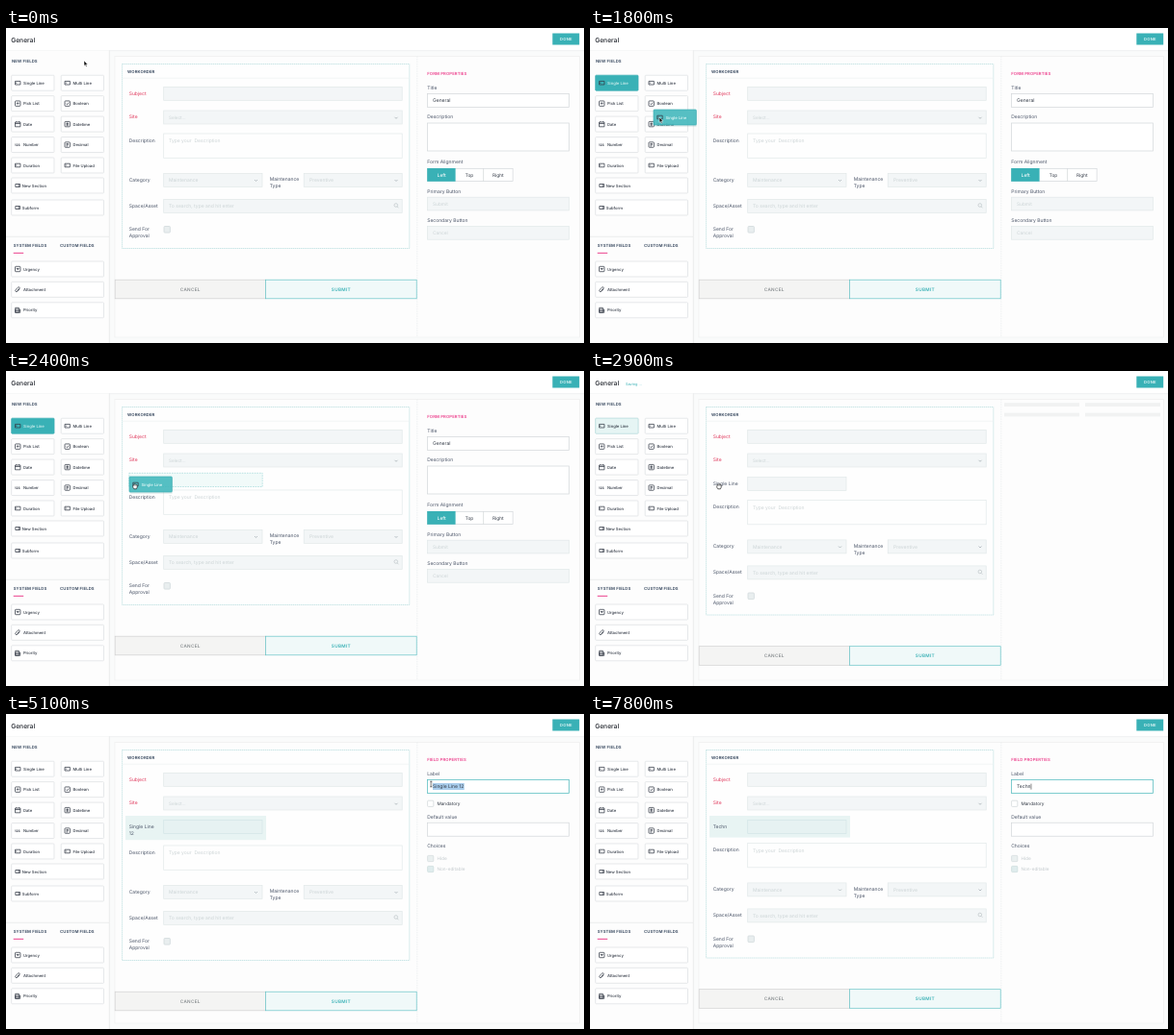
An HTML page for the animation above (8000 ms loop, 600 by 328 pixels).

```html
<!DOCTYPE html>
<html lang="en">
<head>
<meta charset="utf-8">
<title>Form builder</title>
<style>
  html, body { margin: 0; width: 100%; height: 100%; overflow: hidden; background: #fff; }
  svg { display: block; width: 600px; height: 328px; font-family: Inter, "Open Sans", sans-serif; text-rendering: geometricPrecision; }
  text { white-space: pre; }
</style>
</head>
<body>
<script>
const LOOP = 8000;
const TEAL = '#39b1b6', INK = '#333a46', NAVY = '#2f4058', LABEL = '#4b5568';
const RED = '#e0385c', PINK = '#ec3f8c', HINT = '#ccd4d6';
const rules = [];

const pct = ms => (ms / LOOP * 100).toFixed(3) + '%';

// Registers keyframes and returns the style that plays them.
function play(frames) {
  const name = 'k' + rules.length;
  rules.push(`@keyframes ${name}{${frames.join('')}}`);
  return `style="animation:${name} ${LOOP}ms step-end infinite"`;
}

// Holds each value from its time until the next one.
function hold(prop, ...keys) {
  const last = keys[keys.length - 1];
  return play([...keys, [LOOP, last[1]]].map(([ms, v]) => `${pct(ms)}{${prop}:${v}}`));
}

// Shows the markup only during the given [from, to] spans.
function during(spans, markup) {
  const keys = spans[0][0] > 0 ? [[0, 'hidden']] : [];
  for (const [from, to] of spans) {
    keys.push([from, 'visible']);
    if (to < LOOP) keys.push([to, 'hidden']);
  }
  return `<g ${hold('visibility', ...keys)}>${markup}</g>`;
}

// Moves along points, ten positions a second.
function path(points) {
  return play(points.map(([ms, x, y], i) => {
    const next = points[i + 1];
    const n = next ? Math.max(1, Math.round((next[0] - ms) / 100)) : 1;
    return `${pct(ms)}{transform:translate(${x}px,${y}px);animation-timing-function:steps(${n},end)}`;
  }));
}

// Text is placed by the middle of its capitals.
const text = (x, y, s, fill = LABEL, size = 5, extra = '') =>
  `<text x="${x}" y="${(y + size * .36).toFixed(2)}" font-size="${size}" fill="${fill}" ${extra}>${s}</text>`;
const rect = (x, y, w, h, fill, stroke = 'none', extra = '') =>
  `<rect x="${x}" y="${y}" width="${w}" height="${h}" fill="${fill}" stroke="${stroke}" stroke-width=".7" ${extra}/>`;
const line = (d, stroke, w = .7, extra = '') =>
  `<path d="${d}" fill="none" stroke="${stroke}" stroke-width="${w}" ${extra}/>`;
const head = (x, y, s, fill = NAVY) => text(x, y, s, fill, 4.25, 'font-weight="600" letter-spacing=".1"');
const mid = 'text-anchor="middle"';

const SQUARE = 'M-2-2.7h4q.7 0 .7.7v4q0 .7-.7.7h-4q-.7 0-.7-.7v-4q0-.7.7-.7z';
const ICONS = {
  line: 'M-2.7-1.8h5.4v3.6h-5.4zM-1.5-.7v1.4',
  pick: SQUARE + 'M-1.2-.5l1.2 1.2l1.2-1.2z',
  check: SQUARE + 'M-1.3 0l1 1l1.7-2',
  date: 'M-2.7-2.1h5.4v4.8h-5.4zM-2.7-.6h5.4M-1.4-2.9v1M1.4-2.9v1',
  grid: SQUARE + 'M-1.4-.8h2.8M-1.4.9h2.8M0-1.5v3',
  doc: SQUARE + 'M-1.2-1h2.4M-1.2.2h2.4M-1.2 1.4h1.4',
  slim: 'M-2.4-1.5h4.8v3h-4.8zM1-1.5v3',
  clip: 'M2.2-.6l-2.5 2.5q-1.1.9-1.9.1q-.8-.9.1-1.9l2.5-2.4q.8-.6 1.3 0q.5.6-.1 1.3l-2.3 2.2',
  rank: 'M-2.5-2.5h3.6v5h-3.6zM-2.5-.8h5v3.3h-5zM-2.5.9h5'
};
const icon = (name, x, y) => name === 'num'
  ? text(x - 3.2, y, '123', INK, 3.3, 'font-weight="700"')
  : line(ICONS[name], INK, .75, `transform="translate(${x} ${y})"`);

function tile(x, y, w, name, s, fill = '#fff', stroke = '#dcdfe1', ink = INK) {
  const gap = name === 'slim' ? 11 : 12.2;
  return rect(x, y - 8, w, 16, fill, stroke, 'rx=".8"') + icon(name, x + 6.5, y) +
    text(x + gap, y, s, ink, 4.2, 'font-weight="500"');
}

function sidebar() {
  const rows = [
    ['line', 'Single Line', 'line', 'Multi Line'],
    ['pick', 'Pick List', 'check', 'Boolean'],
    ['date', 'Date', 'grid', 'Datetime'],
    ['num', 'Number', 'doc', 'Decimal'],
    ['line', 'Duration', 'line', 'File Upload']
  ];
  let out = rect(0, 23.5, 107, 305, '#fdfdfd') + line('M107.3 23.5V328M0 217.3H107', '#e4e6e7') +
    head(6, 34, 'NEW FIELDS');
  rows.forEach(([a, s, b, u], i) => {
    const y = 57.2 + i * 21.45;
    out += tile(5.7, y, 44.3, a, s) + tile(57.2, y, 44.3, b, u);
  });
  out += tile(5.7, 164, 95.8, 'slim', 'New Section') + tile(5.7, 187, 95.8, 'slim', 'Subform') +
    head(7.7, 226, 'SYSTEM FIELDS') + head(56, 226, 'CUSTOM FIELDS') + line('M7.7 234.3h10.5', PINK, 1) +
    tile(5.7, 251, 95.8, 'pick', 'Urgency') + tile(5.7, 272.3, 95.8, 'clip', 'Attachment') +
    tile(5.7, 293.8, 95.8, 'rank', 'Priority');
  const first = (...look) => tile(5.7, 57.2, 44.3, 'line', 'Single Line', ...look);
  return out +
    during([[1100, 1500], [2700, 3400]], first('#e6f5f4', '#b5dedf')) +
    during([[1500, 2700]], first(TEAL, TEAL, '#d8f1f0'));
}

const off = (x, y, w, h = 14) => rect(x, y, w, h, '#f3f6f7', '#e1e8e9');
const chevron = (x, y) => line(`M${x - 1.5} ${y - .7}l1.5 1.5l1.5-1.5`, '#a9b2b6', .8);

function form() {
  const lower =
    text(127.7, 116.7, 'Description') + rect(163.7, 110, 247.5, 25.3, '#fefefe', '#e1e8e9') +
    text(169, 117.5, 'Type your &#160;Description', HINT) +
    text(127.7, 157.7, 'Category') + off(163.7, 151.4, 102.3) + text(169, 158.5, 'Maintenance', HINT) + chevron(259.5, 158.7) +
    text(273.7, 157.5, 'Maintenance') + text(273.7, 164.5, 'Type') +
    off(309.2, 151.4, 102) + text(315, 158.5, 'Preventive', HINT) + chevron(405, 158.7) +
    text(127.7, 184.7, 'Space/Asset') + off(163.7, 178.4, 247.5) + text(169, 185.5, 'To search, type and hit enter', HINT) +
    '<circle cx="404.8" cy="184.5" r="1.8" fill="none" stroke="#b4bcc0" stroke-width=".6"/>' + line('M406.1 185.9l1.4 1.4', '#b4bcc0', .6) +
    text(127.7, 209.2, 'Send For') + text(127.7, 216.2, 'Approval') + rect(164, 206.5, 6.4, 6.6, '#e9eeef', '#cdd6d9', 'rx=".8"') +
    rect(113.2, 262.2, 156.3, 19.6, '#f4f4f3', '#cfcfcf') + rect(269.6, 262.2, 156.6, 19.6, '#f0f9f9', '#66c3c6') +
    text(191.3, 272, 'CANCEL', '#7b8084', 4.7, mid + ' letter-spacing=".32" font-weight="500"') +
    text(347.9, 272, 'SUBMIT', TEAL, 4.7, mid + ' letter-spacing=".32" font-weight="600"');
  const shift = hold('transform', ...[[0, 0], [2200, 14], [2700, 24.5], [3300, 27], [6400, 24.5]]
    .map(([ms, y]) => [ms, `translateY(${y}px)`]));
  const grow = hold('height', ...[[0, 192], [2200, 206], [2700, 216.5], [3300, 219], [6400, 216.5]]
    .map(([ms, h]) => [ms, h + 'px']));
  return `<rect x="120.6" y="37.5" width="298.2" height="192" fill="#fefefe" stroke="#b3dbdd" stroke-width=".7" stroke-dasharray="1.4 .6" ${grow}/>` +
    line('M120.6 52.2h298', '#edf1f2') + head(126, 45, 'WORKORDER') +
    text(127.7, 68, 'Subject', RED) + off(163.7, 61.3, 247.5) +
    text(127.7, 92.2, 'Site', RED) + off(163.7, 86, 247.5) + text(169, 93.3, 'Select...', HINT, 4.6) + chevron(405, 93.5) +
    `<g ${shift}>${lower}</g>` + newField();
}

// Typed letters appear one by one at these times.
const TYPED = [['T', 6300], ['e', 6700], ['c', 7000], ['h', 7200], ['n', 7700]];
const typed = (x, y, fill) => text(x, y,
  TYPED.map(([c, ms]) => `<tspan ${hold('visibility', [0, 'hidden'], [ms, 'visible'])}>${c}</tspan>`).join(''), fill);

function newField() {
  const height = hold('height', [0, '25.2px'], [6400, '22.6px']);
  const arrows = 'M252.8 118h-2.2m.9-.9l-.9.9l.9.9M256.9 118h2.2m-.9-.9l.9.9l-.9.9';
  return during([[2200, 2700]], rect(127.8, 106.3, 138.4, 14.2, '#f1faf9', '#9fd8d8', 'stroke-dasharray="1.6 1"')) +
    during([[3300, LOOP]], `<rect x="124" y="106" width="146" height="25" fill="#e8f4f3" ${height}/>`) +
    during([[2700, 3300]], off(163.7, 110.5, 102.3) + text(127.7, 116.7, 'Single Line')) +
    during([[3900, LOOP]], rect(163.7, 110.5, 102.3, 14, '#e6f2f2', '#d3e6e7')) +
    during([[3300, 3900]], text(127.7, 116.7, 'Single Line', '#3d9ea5') + text(127.7, 123.9, '12', '#3d9ea5') +
      rect(248.6, 115.4, 13, 5.3, TEAL, 'none', 'rx="2.65"') + line(arrows, '#fff', .6) +
      '<circle cx="266.4" cy="118.1" r="2.5" fill="#fdf3f2" stroke="#e4625f" stroke-width=".7"/>' + line('M265.2 118.1h2.4', '#e4625f')) +
    during([[3900, 6300]], text(127.7, 116.7, 'Single Line') + text(127.7, 123.9, '12')) +
    typed(127.7, 116.7, LABEL);
}

const field = (y, h, stroke = '#d2d6d9') => rect(437.4, y, 147, h, '#fff', stroke);
const box = (y, fill, stroke) => rect(437.6, y, 6.2, 6.2, fill, stroke, 'rx=".8"');

function formPanel() {
  return head(437.2, 47, 'FORM PROPERTIES', PINK) +
    text(437.2, 62, 'Title') + field(68.5, 14) + text(443, 75.6, 'General', INK) +
    text(437.2, 92.5, 'Description') + field(99, 29) + text(437.2, 139.2, 'Form Alignment') +
    rect(437.4, 146.3, 88.7, 13.3, '#fff', '#d2d6d9') + line('M495.6 146.3v13.3', '#d2d6d9') +
    rect(437.2, 146, 29.4, 13.8, TEAL) + text(452.2, 153, 'Left', '#fff', 4.8, mid + ' font-weight="500"') +
    text(481, 153, 'Top', INK, 4.8, mid) + text(510.8, 153, 'Right', INK, 4.8, mid) +
    text(437.2, 169.8, 'Primary Button') + off(437.4, 176.2, 147, 13.7) + text(443, 183.2, 'Submit', HINT, 4.8) +
    text(437.2, 200, 'Secondary Button') + off(437.4, 206.5, 147, 13.7) + text(443, 213.4, 'Cancel', HINT, 4.8);
}

function fieldPanel() {
  const ends = [446.4, 449.3, 452.2, 455, 457.8];
  const caret = hold('transform', [0, 'translateX(0)'], ...TYPED.map(([, ms], i) => [ms, `translateX(${ends[i]}px)`]));
  const grab = [[4400, 0], [4500, 6], [4600, 13], [4700, 20], [4800, 26], [4900, 30], [5000, 32.7]];
  const selW = hold('width', [0, '0px'], ...grab.map(([ms, w]) => [ms, w + 'px']));
  const selX = hold('transform', [0, 'translateX(475.7px)'], ...grab.map(([ms, w]) => [ms, `translateX(${475.7 - w}px)`]));
  return head(437.2, 47, 'FIELD PROPERTIES', PINK) + text(437.2, 62, 'Label') + field(68.5, 14) +
    during([[4400, LOOP]], field(68.5, 14, '#4fbdc0')) +
    during([[4400, 6300]], `<g ${selX}><rect y="72" width="0" height="7" fill="#a9cdec" ${selW}/></g>`) +
    during([[3300, 6300]], text(443, 75.6, 'Single Line 12', INK)) + typed(443, 75.6, INK) +
    during([[6300, LOOP]], `<g ${caret}>${line('M0 72.6v6', '#222', .6)}</g>`) +
    box(90.2, '#fff', '#cfd4d7') + text(447.5, 93.5, 'Mandatory', INK, 4.7) +
    text(437.2, 107, 'Default value') + field(113.2, 14) + text(437.2, 137.4, 'Choices') +
    box(147.4, '#eaf0f0', '#d3dbdd') + text(447.5, 150.7, 'Hide', '#c3cacd', 4.7) +
    box(158.4, '#dfeced', '#cadbdc') + text(447.5, 161.7, 'Non-editable', '#c3cacd', 4.7);
}

const bones = () => [[430, 33.2], [514, 33.2], [430, 43.6], [514, 43.6]]
  .map(([x, y]) => rect(x, y, 78, 3.8, '#f1f2f2')).join('');

function pointer() {
  const shape = (d, fill = '#111') => `<path d="${d}" fill="${fill}" stroke="#fff" stroke-width=".5"/>`;
  const arrow = shape('M0 0v5.4l1.2-1.1l.9 2l1-.4l-.9-2h1.7z');
  const fist = `<path d="M-1.8 1q0-1 .9-.8q.4-.6 1 0q.6-.5 1.1.1q.9-.2 1 .8v2l-.8 1.7h-2.6l-1.2-1.9z" fill="#fff" stroke="#222" stroke-width=".7"/>` +
    line('M-.8.4v1.2M.2.3v1.3M1.2.5v1.2', '#222', .4);
  const hand = `<path d="M-.3.5q.5-.7 1 0v2l1.8.5q.8.3.7 1.2l-.5 2h-2.6l-1.7-2.1q-.3-.9.5-.6l.8.5z" fill="#fff" stroke="#222" stroke-width=".7"/>`;
  const beam = line('M-1-3q1 0 1 .7q0-.7 1-.7M0-2.5v5M-1 3q1 0 1-.7q0 .7 1 .7', '#222', .7);
  const ghost = rect(-5.4, -7, 44.3, 16.8, '#2a6f7422', 'none', 'rx="1.2"') +
    rect(-6, -8, 44.3, 16, '#42b9bde0', '#3aaeb2', 'rx=".8"') +
    icon('line', .5, 0) + text(6.4, 0, 'Single Line', '#e6f8f7', 4.2, 'font-weight="500"');
  const move = path([
    [0, 81, 34], [300, 81, 34], [700, 52, 44], [1000, 21, 54], [1200, 11.7, 57.2], [1400, 11.7, 57.2],
    [1600, 37, 75], [1800, 72, 93], [2100, 110, 108], [2400, 134, 118], [3300, 134, 118],
    [3500, 190, 122], [3700, 266.7, 125], [3900, 345, 108], [4100, 437, 82], [4300, 476, 75],
    [4400, 475.5, 75], [4800, 449, 74], [5000, 441.3, 73], [5300, 441.3, 73], [LOOP, 441.3, 73]
  ]);
  return `<g ${move}>` + during([[1500, 2600]], ghost) +
    during([[0, 2200], [3900, 4100]], arrow) + during([[2200, 3300]], fist) +
    during([[3300, 3900]], hand) + during([[4100, 6300]], beam) + '</g>';
}

const scene =
  rect(0, 0, 600, 328, '#fff') + rect(107, 23.5, 493, 305, '#fafbfb') + line('M0 23.6H600', '#ebedee') +
  text(5.2, 12.8, 'General', '#20242c', 6.7, 'font-weight="500"') +
  during([[2700, 3400]], text(37, 13.6, 'Saving ...', TEAL, 3.9)) +
  rect(567.3, 5.5, 27.9, 12, TEAL) + text(581.4, 11.5, 'DONE', '#e8f8f8', 4.1, mid + ' letter-spacing=".25" font-weight="600"') +
  rect(113, 29.4, 482.4, 292.6, '#fdfdfd', '#eeefef') + line('M426.8 29.4V322', '#e9ebec', .7, 'stroke-dasharray="1.5 1"') +
  sidebar() + form() +
  during([[0, 2700]], formPanel()) + during([[2700, 3300]], bones()) +
  // Nested windows set their own visibility, so the panel opens with the rest.
  during([[3300, LOOP]], fieldPanel()) + pointer();

document.body.innerHTML =
  `<style>${rules.join('')}</style><svg viewBox="0 0 600 328" xmlns="http://www.w3.org/2000/svg">${scene}</svg>`;
</script>
</body>
</html>
```
